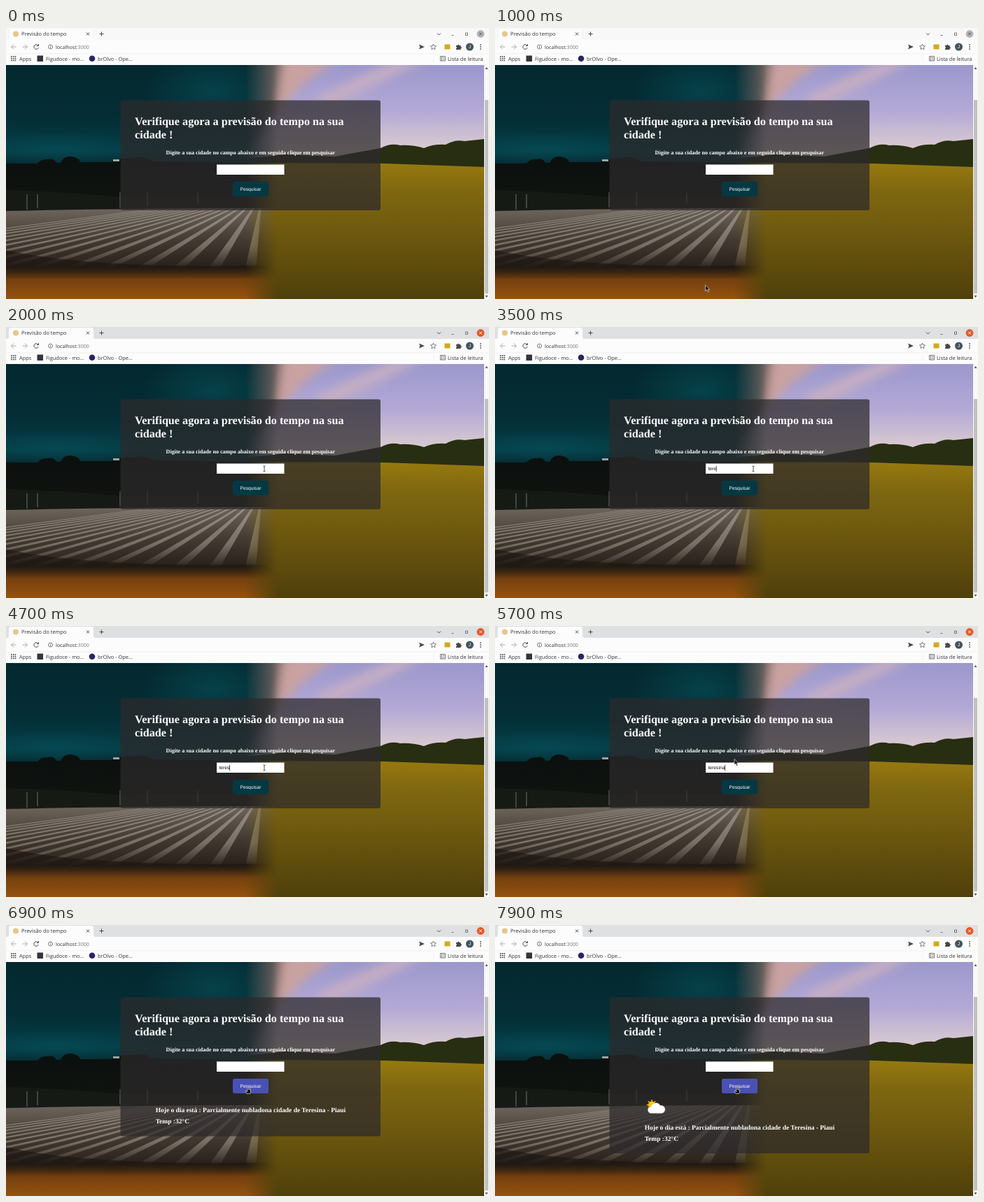
An HTML page that plays this animation: 690 by 388 pixels, repeating every 8000 ms.

```html
<!DOCTYPE html>
<html lang="pt-BR">
<head>
<meta charset="utf-8">
<title>Previsão do tempo</title>
<style>
  html, body { margin: 0; width: 100%; height: 100%; overflow: hidden; background: #fff; }
  svg { display: block; width: 100vw; height: 100vh; }
  text { white-space: pre; text-rendering: geometricPrecision; }
  .ui { font: 7.4px "Open Sans", sans-serif; fill: #303236; }
  .url { font-size: 7.1px; }
  .page { font-family: "Liberation Serif", serif; font-weight: bold; fill: #fff; }
  .form { font: 6.73px "Liberation Sans", sans-serif; }
  .line { fill: none; stroke: #45484c; stroke-width: 1; }
</style>
</head>
<body>
<svg viewBox="0 0 690 388" preserveAspectRatio="none">
  <defs>
    <linearGradient id="storm" x2="0" y2="1">
      <stop offset="0" stop-color="#04282f"/><stop offset=".5" stop-color="#042d35"/>
      <stop offset=".85" stop-color="#043d46"/><stop offset="1" stop-color="#08282d"/>
    </linearGradient>
    <radialGradient id="glow">
      <stop offset="0" stop-color="#07505a" stop-opacity=".6"/><stop offset="1" stop-color="#07505a" stop-opacity="0"/>
    </radialGradient>
    <linearGradient id="hill" x2="0" y2="1">
      <stop offset="0" stop-color="#0a100f"/><stop offset="1" stop-color="#12130f"/>
    </linearGradient>
    <linearGradient id="soil" x2="0" y2="1">
      <stop offset="0" stop-color="#70675e"/><stop offset=".35" stop-color="#443b33"/><stop offset=".7" stop-color="#241c16"/>
    </linearGradient>
    <linearGradient id="ridge" gradientUnits="userSpaceOnUse" x2="0" y1="258" y2="345">
      <stop offset="0" stop-color="#b0a69b"/><stop offset=".6" stop-color="#94897d"/><stop offset="1" stop-color="#94897d" stop-opacity="0"/>
    </linearGradient>
    <linearGradient id="grass" x2="0" y2="1">
      <stop offset="0" stop-color="#53320f" stop-opacity="0"/><stop offset=".4" stop-color="#75400f"/><stop offset="1" stop-color="#96520f"/>
    </linearGradient>
    <linearGradient id="dusk" x2="0" y2="1">
      <stop offset="0" stop-color="#9c98cc"/><stop offset=".45" stop-color="#b3a9d6"/><stop offset=".85" stop-color="#dccdd0"/>
    </linearGradient>
    <linearGradient id="wheat" x2="0" y2="1">
      <stop offset="0" stop-color="#97790f"/><stop offset=".2" stop-color="#806810"/>
      <stop offset=".6" stop-color="#68540e"/><stop offset="1" stop-color="#4f400b"/>
    </linearGradient>
    <linearGradient id="fade" gradientUnits="userSpaceOnUse" x1="342" x2="388">
      <stop offset="0" stop-color="#000"/><stop offset="1" stop-color="#fff"/>
    </linearGradient>
    <mask id="blend" maskUnits="userSpaceOnUse" x="0" y="0" width="690" height="388">
      <rect width="690" height="388" fill="url(#fade)"/>
    </mask>
    <filter id="soft" x="-20%" y="-40%" width="140%" height="180%"><feGaussianBlur stdDeviation="7"/></filter>
    <clipPath id="view"><rect y="53" width="683" height="335"/></clipPath>
    <clipPath id="field"><path d="M0 262Q180 258 400 258V388H0z"/></clipPath>
  </defs>

  <g clip-path="url(#view)">
    <rect y="53" width="420" height="145" fill="url(#storm)"/>
    <ellipse cx="295" cy="90" rx="100" ry="60" fill="url(#glow)"/>
    <ellipse cx="70" cy="172" rx="140" ry="24" fill="url(#glow)"/>
    <path fill="url(#hill)" d="M0 194L45 194Q50 187 60 188Q68 186 72 193L78 193Q82 183 93 184Q105 186 106 192L150 192Q165 185 180 187Q195 182 210 191L420 194V262H0z"/>
    <path fill="#9ba5a3" d="M153 188h9v3h-9z"/>
    <path fill="#161a14" d="M0 232Q80 234 163 242L420 240V262H0z"/>
    <g clip-path="url(#field)">
      <rect y="256" width="420" height="132" fill="url(#soil)"/>
      <g id="furrows" fill="url(#ridge)" opacity=".7"></g>
    </g>
    <path fill="#1c150f" opacity=".6" d="M0 318Q120 345 375 340V366H0z"/>
    <rect y="342" width="420" height="46" fill="url(#grass)"/>
    <path stroke="#85898a" stroke-width=".8" d="M30 238v22M45 238v20M163 235v22M202 235v20M274 236v16"/>

    <g mask="url(#blend)">
      <rect x="340" y="53" width="343" height="145" fill="url(#dusk)"/>
      <g filter="url(#soft)">
        <path fill="#6c625e" d="M330 40H400Q400 85 385 120L330 190z"/>
        <path fill="#c9a2a0" d="M395 45H475L430 75L385 120z"/>
        <path fill="#c5adc4" d="M440 100L560 45H600L460 115z"/>
      </g>
      <path fill="#282e12" d="M340 187L400 181L470 184L535 172Q550 164 563 168Q580 167 597 172Q610 166 628 167Q642 159 655 162L683 159V202H340z"/>
      <path fill="url(#wheat)" d="M340 193L540 194L683 199V388H340z"/>
    </g>
  </g>

  <rect id="panel" x="163.5" y="103.5" width="371.5" height="157.5" rx="3" fill="#2c2a2b" fill-opacity=".73"/>
  <g class="page">
    <g font-size="16.16"><text x="184" y="138.5">Verifique agora a previsão do tempo na sua</text><text x="184" y="157.5">cidade !</text></g>
    <text x="349.3" y="181" font-size="8.08" text-anchor="middle">Digite a sua cidade no campo abaixo e em seguida clique em pesquisar</text>
    <g id="result" font-size="9.45">
      <text x="213.7" y="268">Hoje o dia está : Parcialmente nubladona cidade de Teresina - Piauí</text>
      <text x="213.7" y="284">Temp :32°C</text>
    </g>
  </g>
  <g id="weather">
    <path stroke="#f2b40f" stroke-width="1.5" d="M224 250v15M216.5 257.5h15M218.7 252.2l10.6 10.6M229.3 252.2l-10.6 10.6"/>
    <circle cx="224" cy="257.5" r="5" fill="#f9c21c"/>
    <path fill="#fff" stroke="#d5dce3" stroke-width=".4" d="M223 269.5a4.5 4.5 0 0 1 0-9a7 7 0 0 1 13-2a5.6 5.6 0 0 1 2.5 11z"/>
  </g>
  <rect x="301" y="195.5" width="96.5" height="14.5" fill="#fff"/>
  <text id="typed" class="form" x="304.5" y="205.2" fill="#111"></text>
  <path id="caret" stroke="#000" stroke-width=".7" d="M0 199v8"/>
  <rect id="button" x="324" y="220" width="51" height="21" rx="2.5"/>
  <text class="form" x="349.5" y="233" fill="#fff" text-anchor="middle">Pesquisar</text>

  <rect x="683" y="53" width="7" height="335" fill="#f8f8f8"/>
  <rect x="684" y="103" width="5" height="277" fill="#c1c1c1"/>
  <path fill="#555" d="M684.5 59l2-3l2 3zM684.5 383l2 3l2-3z"/>

  <rect id="bar" width="690" height="20"/>
  <path fill="#fcfcfc" d="M0 17H2Q4 17 4 14V4Q4 1 7 1H122Q125 1 125 4V14Q125 17 128 17H690V53H0z"/>
  <path stroke="#e6e8ea" stroke-width=".6" d="M0 37H690M611 40V49M4 3V15M125 3V15"/>
  <circle cx="14" cy="8.5" r="4" fill="#e8c58a"/>
  <g class="ui">
    <text x="22" y="11.2">Previsão do tempo</text>
    <text x="71" y="29.6"><tspan class="url">localhost</tspan><tspan class="url" fill="#74777b">:3000</tspan></text>
    <text x="19" y="46.5">Apps</text>
    <text x="57" y="46.5">Figudoce - mo…</text>
    <text x="131" y="46.5">brOlvo - Ope…</text>
    <text x="631" y="46.5">Lista de leitura</text>
  </g>
  <g class="line">
    <path d="M115 6.5l4 4M119 6.5l-4 4M133.500 8.500h6M136.5 5.5v6M616 7.5l2.500 2.500l2.500-2.500"/>
    <path stroke-width=".7" d="M636.500 10.500h3M656.500 7h3v3.500h-3z"/>
    <path stroke="#a9abae" d="M14.5 27h-7M11 23.5L7.5 27L11 30.5M23.5 27h7M27 23.5L30.5 27L27 30.5"/>
    <path d="M45.8 25A3.3 3.3 0 1 0 46.3 28M46.5 23v2.5H44"/>
    <g stroke-width=".7">
      <circle cx="63.5" cy="27" r="3"/><path d="M63.5 26.5v2.3M63.5 25v.8"/>
      <path d="M610.5 23l1.2 2.6l2.8.3l-2.1 1.9l.6 2.8l-2.5-1.4l-2.5 1.4l.6-2.8l-2.1-1.9l2.8-.3z"/>
      <path d="M620.5 40.5h7v6.5h-7zM622.5 40.5v6.5M624 42.5h2.5M624 45h2.5"/>
    </g>
  </g>
  <path fill="#45484c" d="M590 23.5l8 3.5l-8 3.5l1.5-3.5zM643 25h2a1.3 1.3 0 0 1 2.6 0h2v2a1.3 1.3 0 0 1 0 2.6v1.4h-6.6v-2a1 1 0 0 0 0-2z"/>
  <rect x="626.5" y="23.5" width="8" height="7" fill="#d6a81e"/>
  <circle cx="662.5" cy="27" r="5.5" fill="#43545e"/>
  <text x="662.5" y="29.3" class="form" text-anchor="middle" fill="#fff">J</text>
  <rect x="44.5" y="39.5" width="8.5" height="8.5" fill="#34353a"/>
  <circle cx="123" cy="43.8" r="4.3" fill="#242466"/>
  <g id="dots" fill="#4e5155"></g>
  <circle id="close" cx="678" cy="8.5" r="5.4"/>
  <path id="cross" d="M676 6.5l4 4M680 6.5l-4 4" stroke-width="1"/>

  <g id="cursor">
    <path id="arrow" fill="#111" stroke="#fff" stroke-width=".6" d="M0 0v8.500l2-1.900l1.500 3.400l1.500-.7l-1.500-3.200h2.700z"/>
    <path id="beam" fill="none" stroke="#222" stroke-width=".8" d="M-1.500-4Q0-4 0-3V3Q0 4-1.500 4M1.500-4Q0-4 0-3M0 3Q0 4 1.500 4"/>
    <path id="hand" fill="#111" stroke="#fff" stroke-width=".6" d="M-.8 0Q0-1 .8 0V3.200L4 4V7.500L3 9.500H-1.500L-3.500 6L-2.500 5.200L-.8 6.500z"/>
  </g>
</svg>
<script>
const $ = id => document.getElementById(id);
const show = (id, on) => $(id).setAttribute('visibility', on ? 'visible' : 'hidden');
const set = (id, name, value) => $(id).setAttribute(name, value);

// Furrows fan out from a point beyond the field; dots form the menu icons.
let wedges = '';
for (let i = 0; i < 16; i++) {
  const x = -500 + i * 56;
  wedges += `<path d="M366 238L${x} 352h${24 - i * .5}z"/>`;
}
$('furrows').innerHTML = wedges;

let dots = '';
for (let i = 0; i < 9; i++) dots += `<rect x="${7 + i % 3 * 2.8}" y="${40 + (i / 3 | 0) * 2.8}" width="1.7" height="1.7"/>`;
for (let i = 0; i < 3; i++) dots += `<circle cx="678" cy="${24 + i * 3}" r=".9"/>`;
$('dots').innerHTML = dots;

const LOOP = 8000, CITY = 'teresina';
const keys = [2900, 3100, 3300, 3500, 4700, 4900, 5000, 5200];
const path = [
  [600, 312, 392], [1000, 300.5, 368], [1300, 300.5, 368], [1900, 369, 203],
  [5500, 369, 203], [5700, 342, 190.5], [5900, 342, 190.5], [6400, 345.5, 232], [LOOP, 345.5, 232]
];

function pointer(t) {
  const i = Math.max(1, path.findIndex(p => p[0] >= t));
  const [t0, x0, y0] = path[i - 1], [t1, x1, y1] = path[i];
  let k = Math.min(1, Math.max(0, (t - t0) / (t1 - t0)));
  k = k * k * (3 - 2 * k);
  return [x0 + (x1 - x0) * k, y0 + (y1 - y0) * k];
}

const inside = (x, y, l, t, r, b) => x > l && x < r && y > t && y < b;

function draw(t) {
  const [x, y] = pointer(t);
  const overInput = inside(x, y, 301, 196, 397, 210);
  const overButton = inside(x, y, 324, 220, 375, 241);
  const focused = t >= 1900, answered = t >= 6700, icon = t >= 7100;

  set('cursor', 'transform', `translate(${x} ${y})`);
  show('beam', t >= 600 && overInput);
  show('hand', overButton);
  show('arrow', t >= 600 && !overInput && !overButton);

  set('bar', 'fill', focused ? '#dee0e2' : '#f8f8f8');
  set('close', 'fill', focused ? '#e65525' : '#b4b5b7');
  set('cross', 'stroke', focused ? '#fff' : '#55585c');

  const count = answered ? 0 : keys.filter(k => k <= t).length;
  const typed = $('typed');
  typed.textContent = CITY.slice(0, count);
  const last = count ? keys[count - 1] : 2400;
  const width = count ? typed.getComputedTextLength() : 0;
  set('caret', 'transform', `translate(${304.6 + width} 0)`);
  show('caret', t >= 2400 && t < 6600 && (t - last) % 1000 < 600);

  set('button', 'fill', overButton ? '#4a51b5' : '#043943');
  set('panel', 'height', icon ? 223.5 : answered ? 199 : 157.5);
  show('result', answered);
  set('result', 'transform', `translate(0 ${icon ? 25 : 0})`);
  show('weather', icon);
}

function tick() {
  draw(Math.floor(performance.now() % LOOP / 100) * 100);
  requestAnimationFrame(tick);
}
tick();
</script>
</body>
</html>
```
